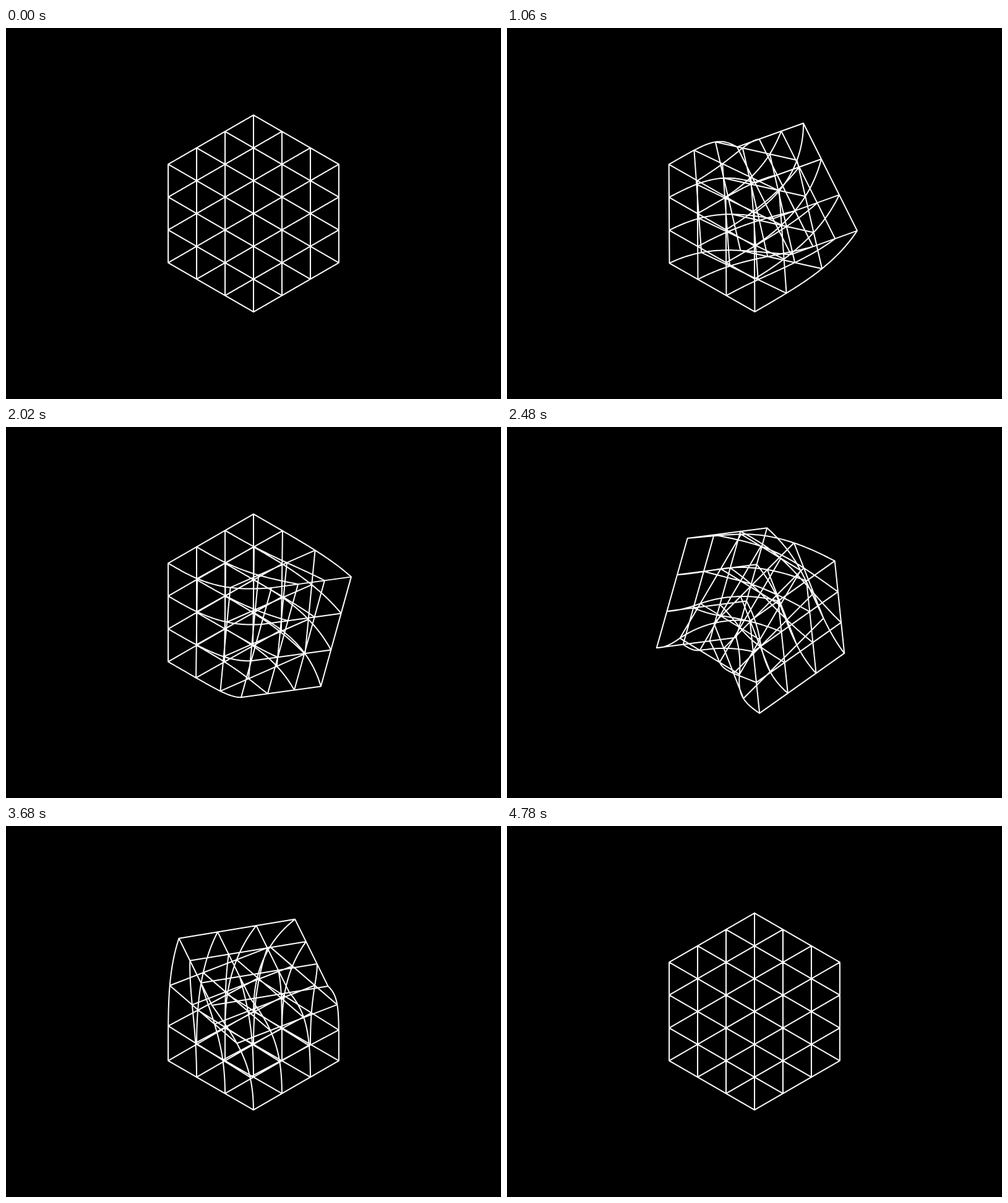
Recreate the animation shown at these times as an HTML page with a canvas. Size 800 by 600 pixels, loop 4.8 s.

```html
<!DOCTYPE html>
<html lang="en">
<head>
<meta charset="utf-8">
<title>Twisting lattice cube</title>
<style>
  html, body { margin: 0; width: 100%; height: 100%; overflow: hidden; background: #000; }
  canvas { display: block; }
</style>
</head>
<body>
<canvas id="stage" width="800" height="600"></canvas>
<script>
const ctx = document.getElementById('stage').getContext('2d');

const SIDE = 195, CELLS = 3, STEPS = 60;
const TWIST_MS = 1600, TICK_MS = 20, DELAY = 0.4, POWER = 2.5;

// Isometric projections of the cube's edges
const X = [SIDE * Math.sqrt(1 / 2), SIDE * Math.sqrt(1 / 6)];
const Y = [-X[0], X[1]];
const Z = [0, SIDE * Math.sqrt(2 / 3)];
const negate = ([x, y]) => [-x, -y];

// Each twist turns u towards v; the slice at the +n end leads
const twists = [
  { u: X, v: Z, n: Y },
  { u: negate(Y), v: Z, n: X },
  { u: X, v: Y, n: negate(Z) },
];

const lattice = Array.from({ length: CELLS + 1 }, (_, i) => i / CELLS - 0.5);

function ease(p) {
  const x = Math.min(1, Math.max(0, p));
  return x < 0.5
    ? 0.5 * Math.pow(2 * x, POWER)
    : 1 - 0.5 * Math.pow(2 * (1 - x), POWER);
}

function project({ u, v, n }, progress, a, b, c) {
  const angle = Math.PI / 2 * ease((1 + DELAY) * progress - DELAY * (0.5 - c));
  const cos = Math.cos(angle), sin = Math.sin(angle);
  const p = a * cos - b * sin, q = a * sin + b * cos;
  return [0, 1].map(k => p * u[k] + q * v[k] + c * n[k]);
}

function draw(ms) {
  const tick = Math.floor(ms / TICK_MS + 1e-6) * TICK_MS % (TWIST_MS * twists.length);
  const twist = twists[Math.floor(tick / TWIST_MS)];
  const progress = tick % TWIST_MS / TWIST_MS;

  const trace = (steps, pointAt) => {
    for (let i = 0; i <= steps; i++) {
      const point = project(twist, progress, ...pointAt(i / steps - 0.5));
      if (i) ctx.lineTo(...point);
      else ctx.moveTo(...point);
    }
  };

  ctx.setTransform(1, 0, 0, 1, 0, 0);
  ctx.fillStyle = '#000';
  ctx.fillRect(0, 0, 800, 600);
  ctx.translate(400, 300);
  ctx.strokeStyle = '#fff';
  ctx.lineWidth = 2;
  ctx.lineJoin = ctx.lineCap = 'round';

  ctx.beginPath();
  for (const i of lattice) {
    for (const j of lattice) {
      trace(1, s => [s, i, j]);
      trace(1, s => [i, s, j]);
      trace(STEPS, s => [i, j, s]);
    }
  }
  ctx.stroke();
}

const start = performance.now();
function loop() {
  draw(performance.now() - start);
  requestAnimationFrame(loop);
}
loop();
</script>
</body>
</html>
```
